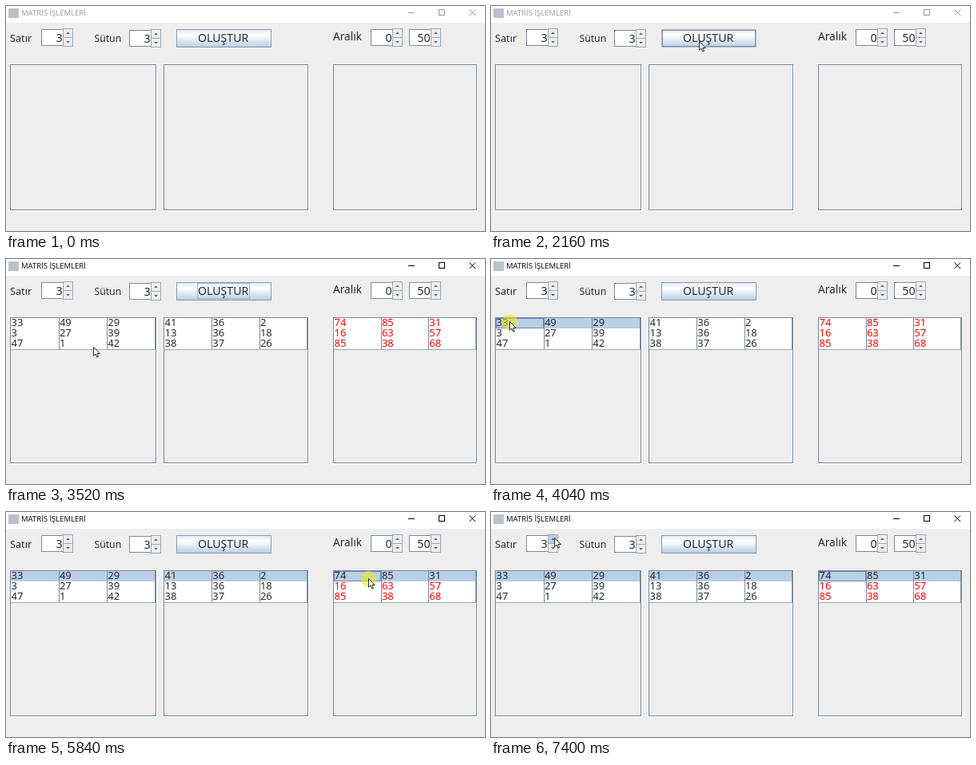
An HTML page with a canvas for the animation above (8 s loop, 599 by 282 pixels).

```html
<!DOCTYPE html>
<html lang="tr">
<head>
<meta charset="utf-8">
<title>MATRİS İŞLEMLERİ</title>
<style>
  html, body { margin: 0; width: 100%; height: 100%; overflow: hidden; background: #eee; }
  canvas { display: block; }
</style>
</head>
<body>
<canvas id="stage" width="599" height="282"></canvas>
<script>
const g = document.getElementById('stage').getContext('2d');
const LOOP = 8000, STEP = 40, PRESS = 120;
const EDGE = '#7a8a99', SOFT = '#9ca8b4', INK = '#292929', BLUE = '#b8cfe5', FOCUS = '#6382bf';
const ACTIVATE = 2720, FILLED = 2840;

// Pointer moves: begin, end, target x, target y, vertical bow
const moves = [
  [480, 1000, 482, 38],
  [1160, 2000, 128, 36],
  [2000, 2160, 260, 44],
  [2480, 2520, 259, 42],
  [3000, 3880, 23, 78, 50],
  [4120, 4360, 213, 87],
  [4600, 4720, 211, 83],
  [5000, 5640, 453, 83],
  [5960, 6280, 415, 83],
  [6520, 6560, 370, 81],
  [6560, 7160, 69, 28, -18],
  [7320, 7400, 79, 32]
];
const spinners = [[44, 28, 3], [154, 29, 3], [456, 28, 0], [504, 28, 50]];

const left = [[33, 49, 29], [3, 27, 39], [47, 1, 42]];
const right = [[41, 36, 2], [13, 36, 18], [38, 37, 26]];
const sum = left.map((row, r) => row.map((n, c) => n + right[r][c]));
// picked: when the first row is selected, until: when its cell loses focus
const tables = [
  { x: 5, w: 183, rows: left, picked: 4040, until: 4920 },
  { x: 197, w: 181, rows: right, picked: 4920, until: 5840 },
  { x: 409, w: 180, rows: sum, picked: 5840, until: LOOP, color: '#f00' }
];
const clicks = [ACTIVATE, ...tables.map(s => s.picked)];
const arrow = new Path2D('M.5 .5v10.8l2.5 -2.2 1.7 4 1.8 -.8 -1.7 -3.8h3.4z');

function fill(x, y, w, h, color) {
  g.fillStyle = color;
  g.fillRect(x, y, w, h);
}
function frame(x, y, w, h, color) {
  g.strokeStyle = color;
  g.lineWidth = 1;
  g.strokeRect(x + .5, y + .5, w - 1, h - 1);
}
function text(s, x, y, size, color = INK, align = 'left', family = 'Noto Sans') {
  g.font = `${size}px "${family}", sans-serif`;
  g.textAlign = align;
  g.fillStyle = color;
  g.fillText(s, x, y);
}
function shade(y, h) {
  const s = g.createLinearGradient(0, y, 0, y + h);
  ['#dde8f3', '#fff', '#dde8f3', BLUE].forEach((c, i) => s.addColorStop(i / 3, c));
  return s;
}
const inside = (p, x, y, w, h) => p && p[0] >= x && p[0] < x + w && p[1] >= y && p[1] < y + h;

function pointer(t) {
  if (t <= moves[0][0]) return null;
  let x = 546, y = 280;
  for (const [begin, end, tx, ty, bow = 0] of moves) {
    const u = Math.min(1, Math.max(0, (t - begin) / (end - begin)));
    const e = u * u * (3 - 2 * u);
    x += (tx - x) * e;
    y += (ty - y) * e + bow * Math.sin(Math.PI * e);
    if (u < 1) break;
  }
  return [Math.round(x), Math.round(y)];
}

function titleBar(active) {
  const c = active ? '#000' : '#999';
  fill(0, 0, 599, 21, '#fff');
  fill(3, 3, 13, 12, '#b9c2ca');
  text('MATRİS İŞLEMLERİ', 19, 12.4, 9.5, c, 'left', 'Open Sans');
  fill(503, 8, 8, 1, c);
  frame(541, 4, 8, 8, c);
  g.beginPath();
  g.moveTo(579.5, 4.5); g.lineTo(587, 12);
  g.moveTo(587, 4.5); g.lineTo(579.5, 12);
  g.stroke();
}

function spinner(x, y, value, lit) {
  fill(x, y + 1, 27, 21, '#fff');
  frame(x, y + 1, 28, 21, EDGE);
  text(value, x + 26.6, y + 16.9, 14.3, INK, 'right');
  for (const dir of [-1, 1]) {
    const top = dir < 0 ? y : y + 11, cx = x + 33.5, cy = top + 6;
    fill(x + 27, top, 13, 12, lit && dir < 0 ? BLUE : '#eee');
    frame(x + 27, top, 13, 12, SOFT);
    g.beginPath();
    g.moveTo(cx - 2.5, cy - dir);
    g.lineTo(cx + 2.5, cy - dir);
    g.lineTo(cx, cy + dir * 1.6);
    g.fillStyle = '#596875';
    g.fill();
  }
}

function button(t, hover) {
  const pressed = t >= ACTIVATE && t < FILLED;
  fill(213, 29, 118, 22, pressed ? BLUE : shade(29, 22));
  frame(213, 29, 119, 23, hover ? '#a9b7c5' : '#8b9aa9');
  if (hover) frame(214, 30, 117, 21, '#7f97ae');
  if (t >= ACTIVATE && t < tables[0].picked) frame(239, 30, 66, 20, '#a3b8cc');
  text('OLUŞTUR', 240, 45.2, 14.1);
}

function table({ x, w, picked, until, color = INK, rows }, t) {
  frame(x, 73, w, 183, EDGE);
  fill(x + w, 74, 1, 183, '#fff');
  fill(x + 1, 256, w, 1, '#fff');
  if (t < FILLED) return;
  const col = (w - 2) / 3;
  rows.forEach((row, r) => {
    const y = 74 + r * 13, on = r === 0 && t >= picked;
    fill(x + 1, y, w - 2, 13, on ? BLUE : '#fff');
    fill(x + 1, y + 13, w - 2, 1, SOFT);
    row.forEach((n, c) => {
      const edge = Math.min(x + w - 2, Math.floor(x + 1 + (c + 1) * col));
      fill(edge, y, 1, 13, EDGE);
      text(n, x + 1.6 + c * col, y + 10.2, 13, on ? INK : color);
    });
  });
  if (t >= picked && t < until) {
    frame(x + 1, 74, Math.round(col), 13, FOCUS);
    fill(x + 1, 86, Math.round(col), 1, FOCUS);
  }
}

function drawPointer(x, y, beam) {
  if (beam) {
    fill(x, y - 6, 1, 13, '#000');
    for (const end of [-6, 6]) fill(x - 2, y + end, 5, 1, '#000');
    return;
  }
  g.save();
  g.translate(x, y);
  g.fillStyle = '#fff';
  g.strokeStyle = '#111';
  g.lineWidth = .9;
  g.fill(arrow);
  g.stroke(arrow);
  g.restore();
}

function draw(t) {
  const p = pointer(t);
  fill(0, 0, 599, 282, '#eee');
  titleBar(t >= ACTIVATE);
  text('Satır', 5, 45, 12.7);
  text('Sütun', 110.5, 45.2, 12.2);
  text('Aralık', 409, 43.3, 13.6);
  spinners.forEach(([x, y, v], i) => spinner(x, y, v, i === 0 && t >= 7400));
  button(t, inside(p, 213, 29, 119, 23));
  tables.forEach(s => table(s, t));
  if (!p) return;
  const [x, y] = p;
  if (clicks.some(c => t >= c && t < c + PRESS)) {
    g.beginPath();
    g.arc(x + .5, y + 1, 10, 0, 7);
    g.fillStyle = 'rgba(240,235,20,.55)';
    g.fill();
  }
  drawPointer(x, y, spinners.some(([sx, sy]) => inside(p, sx, sy + 1, 27, 21)));
}

const start = performance.now();
function tick() {
  const t = (performance.now() - start) % LOOP;
  draw(Math.floor(t / STEP) * STEP);
  requestAnimationFrame(tick);
}
tick();
</script>
</body>
</html>
```
